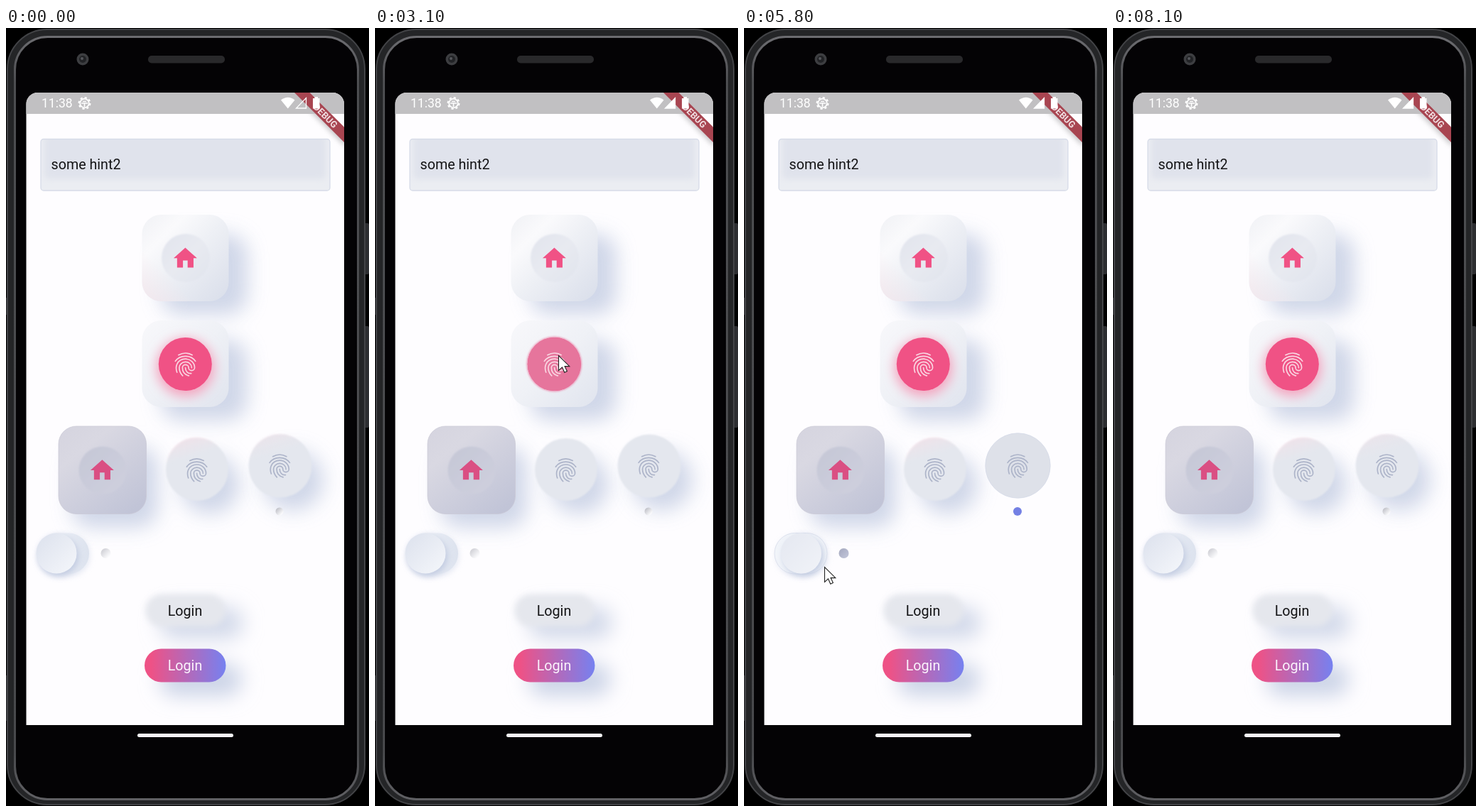
An HTML page that plays this animation: 511 by 1096 pixels, repeating every 8.8 s.

```html
<!DOCTYPE html>
<html lang="en">
<head>
<meta charset="utf-8">
<title>Soft UI demo</title>
<style>
  html, body { margin: 0; width: 100%; height: 100%; overflow: hidden; background: #000; }
  svg { display: block; width: 100%; height: 100%; }
  text { font-family: Roboto, "Open Sans", sans-serif; }
</style>
</head>
<body>
<svg viewBox="0 0 511 1096" preserveAspectRatio="none">
  <defs>
    <filter id="b1" x="-50%" y="-50%" width="200%" height="200%"><feGaussianBlur stdDeviation="1.2"/></filter>
    <filter id="b4" x="-50%" y="-50%" width="200%" height="200%"><feGaussianBlur stdDeviation="4"/></filter>
    <filter id="b9" x="-50%" y="-50%" width="200%" height="200%"><feGaussianBlur stdDeviation="8"/></filter>
    <filter id="b14" x="-60%" y="-60%" width="220%" height="220%"><feGaussianBlur stdDeviation="14"/></filter>
    <linearGradient id="rim" x2="0" y2="1">
      <stop stop-color="#6c6c70"/><stop offset=".06" stop-color="#4c4d50"/>
      <stop offset=".94" stop-color="#48494c"/><stop offset="1" stop-color="#606064"/>
    </linearGradient>
    <linearGradient id="tile" x2="1" y2="1">
      <stop stop-color="#f0f1f5"/><stop offset=".25" stop-color="#fafafc"/><stop offset=".5" stop-color="#eef0f5"/><stop offset="1" stop-color="#d9deea"/>
    </linearGradient>
    <linearGradient id="paleTile" x2="1" y2="1">
      <stop stop-color="#f8f8fb"/><stop offset=".5" stop-color="#eff1f6"/><stop offset="1" stop-color="#e0e4ee"/>
    </linearGradient>
    <linearGradient id="dish" x2="1" y2="1">
      <stop stop-color="#e1e4ed"/><stop offset=".5" stop-color="#e8eaf1"/><stop offset="1" stop-color="#e0e4ed"/>
    </linearGradient>
    <linearGradient id="darkTile" x2=".8" y2="1">
      <stop stop-color="#d5d4df"/><stop offset=".3" stop-color="#d9d8e2"/><stop offset="1" stop-color="#c1c4d7"/>
    </linearGradient>
    <linearGradient id="darkDish" x2="1" y2="1">
      <stop stop-color="#c5c7d6"/><stop offset="1" stop-color="#cfd0de"/>
    </linearGradient>
    <linearGradient id="blush" x2=".3" y2="1">
      <stop stop-color="#f4dfe7"/><stop offset=".4" stop-color="#f0e4ea" stop-opacity="0"/>
    </linearGradient>
    <linearGradient id="lowBlush" x1="1" x2="0" y2="1">
      <stop offset=".7" stop-color="#f5e4ea" stop-opacity="0"/><stop offset="1" stop-color="#f5e4ea"/>
    </linearGradient>
    <linearGradient id="thumb" x2="1" y2="1">
      <stop stop-color="#dce1ed"/><stop offset="1" stop-color="#f5f7fb"/>
    </linearGradient>
    <linearGradient id="track"><stop stop-color="#fafbfd"/><stop offset="1" stop-color="#dce2ee"/></linearGradient>
    <linearGradient id="bead" x2="1" y2="1">
      <stop stop-color="#b4b5bd"/><stop offset=".8" stop-color="#fafafc"/>
    </linearGradient>
    <linearGradient id="candy"><stop offset=".08" stop-color="#ee5286"/><stop offset="1" stop-color="#7681f0"/></linearGradient>
    <clipPath id="screen"><path d="M28.500 982V107a16 16 0 0 1 16-16H460a16 16 0 0 1 16 16V982z"/></clipPath>
    <clipPath id="field"><rect x="49" y="156" width="407" height="73" rx="4"/></clipPath>
    <path id="home" d="M10 20v-6h4v6h5v-8h3L12 3 2 12h3v8z"/>
    <g id="print" fill="none" stroke-linecap="round">
      <path d="M6.2 4C9.8 2 14.2 2 17.8 4M3.5 9.2C7.5 3.6 16.5 3.6 20.5 9.2"/>
      <path d="M14.9 21.5C11.5 20.6 9.5 18 9.5 14.7C9.5 13.3 10.6 12.2 12.1 12.2S14.7 13.3 14.7 14.7C14.7 16 15.8 17.1 17.2 17.1S19.8 16 19.8 14.7C19.8 10.6 16.4 7.3 12.1 7.3C9 7.3 6.2 9 4.9 11.7C4 13.6 4 16 4.9 18.6"/>
      <path d="M9.7 21.5C7.8 19.6 6.8 17.8 6.8 14.7C6.8 12 9.2 9.8 12.1 9.8S17.3 12 17.3 14.7M12 14.7C12 18 14.4 19.9 16.9 19.5"/>
    </g>
  </defs>

  <!-- phone body -->
  <rect width="511" height="1096"/>
  <g fill="#2d2e31">
    <rect x="504" y="275" width="7" height="72" rx="2"/><rect x="504" y="420" width="7" height="143" rx="2"/>
    <rect y="380" width="3" height="24"/><rect y="912" width="3" height="64"/>
  </g>
  <rect x="2" y="2" width="503" height="1092" rx="56" fill="#242527" stroke="#434447" stroke-width="2"/>
  <rect x="12.500" y="12.500" width="483" height="1074" rx="46" fill="#040305" stroke="url(#rim)" stroke-width="3"/>
  <circle cx="108" cy="44" r="8.5" fill="#3d3e41"/><circle cx="108" cy="44" r="5" fill="#222326"/><circle cx="107" cy="43" r="2" fill="#55575c"/>
  <rect x="200" y="39" width="108" height="10.5" rx="5" fill="#29292b"/>
  <rect x="185" y="994" width="135" height="5" rx="2.5" fill="#f5f4f7"/>

  <g clip-path="url(#screen)">
    <rect x="28" y="91" width="448" height="891" fill="#fefdff"/>

    <!-- text field -->
    <g clip-path="url(#field)">
      <rect x="49" y="156" width="407" height="73" fill="#ebedf2"/>
      <rect x="54" y="150" width="396" height="63" rx="6" fill="#e0e3ec" filter="url(#b4)"/>
    </g>
    <rect x="49" y="156.5" width="407" height="72.5" rx="4" fill="none" stroke="#d7dce8" stroke-width="1.3"/>
    <text x="63.500" y="199" font-size="19.7" fill="#141416">some hint2</text>

    <!-- shadows -->
    <g fill="#cbd3e6" filter="url(#b14)" opacity=".9">
      <rect x="218" y="290" width="122" height="114" rx="28"/>
      <rect x="218" y="439" width="122" height="114" rx="28"/>
      <rect x="92" y="590" width="122" height="114" rx="28"/>
      <circle cx="287" cy="643" r="42"/>
    </g>
    <circle id="keyShadow" cx="404" cy="637" r="43" fill="#cbd3e6" filter="url(#b14)" opacity=".9"/>

    <!-- first tile -->
    <rect x="191.500" y="263" width="122" height="122" rx="27" fill="url(#tile)"/>
    <rect class="tint" x="191.500" y="263" width="122" height="122" rx="27" fill="url(#lowBlush)" opacity=".7"/>
    <circle cx="253" cy="324" r="34" fill="url(#dish)" filter="url(#b1)"/>
    <use href="#home" fill="#f05285" transform="translate(232.600 304.500) scale(1.65)"/>

    <!-- pink button -->
    <rect x="191.500" y="412" width="122" height="122" rx="27" fill="url(#paleTile)"/>
    <circle id="glow" cx="252.500" cy="478" r="41" fill="#f4a6c0" filter="url(#b9)"/>
    <circle id="halo" cx="252.300" cy="473.500" r="39" fill="#ea7fa5" filter="url(#b1)"/>
    <circle cx="252.300" cy="473.500" r="37.500" fill="#f05285"/>
    <circle id="pressed" cx="252.300" cy="473.500" r="37.500" fill="#e6759c"/>
    <use href="#print" stroke="#fad6e2" transform="translate(232.500 454) scale(1.67)"/>

    <!-- dark tile -->
    <rect x="74" y="561" width="123.500" height="123.500" rx="25" fill="url(#darkTile)" stroke="#c9c7d5" stroke-width=".7"/>
    <circle cx="136" cy="623" r="33.500" fill="url(#darkDish)" filter="url(#b1)"/>
    <use href="#home" fill="#da4f83" transform="translate(115.600 603.200) scale(1.65)"/>

    <!-- round buttons -->
    <circle cx="269" cy="622" r="44" fill="#e4e7ee" filter="url(#b1)"/>
    <circle class="tint" cx="268.500" cy="621.500" r="45" fill="url(#blush)" filter="url(#b1)"/>
    <use href="#print" stroke="#adb4c9" transform="translate(248.500 602.800) scale(1.67)"/>
    <g id="keyUp">
      <circle cx="386" cy="617" r="44.500" fill="#e4e7ee" filter="url(#b1)"/>
      <circle class="tint" cx="385.500" cy="616.500" r="45" fill="url(#blush)" filter="url(#b1)" opacity=".6"/>
    </g>
    <circle id="keyDown" cx="385.500" cy="616.500" r="45.700" fill="#dee1e9" stroke="#d5dae7" stroke-width=".8"/>
    <use href="#print" stroke="#adb4c9" transform="translate(365.200 597) scale(1.67)"/>
    <circle cx="385" cy="681" r="5.500" fill="url(#bead)"/>
    <circle id="keyLamp" cx="385" cy="681" r="6" fill="#7480e4"/>

    <!-- switch -->
    <rect x="45" y="714" width="73" height="58" rx="29" fill="#d3daea" filter="url(#b4)" opacity=".6"/>
    <rect x="43" y="711.500" width="74" height="57.500" rx="28.700" fill="url(#track)"/>
    <rect id="trackOn" x="43" y="711.500" width="74" height="57.500" rx="28.700" fill="#f1f4f9" stroke="#dde2ee"/>
    <g id="knob">
      <circle cx="74" cy="744" r="28.500" fill="#bcc6de" filter="url(#b4)" opacity=".85"/>
      <circle cx="71" cy="740" r="28.500" fill="url(#thumb)"/>
      <circle id="knobOn" cx="71" cy="740" r="28.500" fill="#edf0f6"/>
    </g>
    <circle cx="140.500" cy="740" r="7" fill="url(#bead)" opacity=".75"/>
    <circle id="lamp" cx="140.500" cy="740" r="7" fill="#7f87ae"/>

    <!-- login buttons -->
    <g fill="#ccd4e7" filter="url(#b14)">
      <rect id="softShadow" x="216" y="815" width="118" height="46" rx="22" opacity=".85"/>
      <rect id="candyShadow" x="216" y="895" width="116" height="46" rx="22"/>
    </g>
    <rect x="196" y="797.500" width="113" height="46" rx="23" fill="#e5e7ed" filter="url(#b4)"/>
    <rect id="softDown" x="195.500" y="797.500" width="114" height="46" rx="23" fill="#dee1e9"/>
    <rect x="195" y="874.500" width="114.500" height="47" rx="23.500" fill="url(#candy)"/>
    <g font-size="19.7" text-anchor="middle">
      <text x="252" y="828" fill="#141416">Login</text>
      <text x="252" y="905" fill="#fbf3fb">Login</text>
    </g>

    <!-- status bar -->
    <path d="M409 88L479 158V166L401 88z" filter="url(#b4)" opacity=".35"/>
    <rect x="28" y="91" width="448" height="30" fill="#c1c0c2"/>
    <path d="M406 91L476 161V139.500L427.500 91z" fill="#a84551"/>
    <text transform="translate(446.500 127) rotate(45)" font-size="13" font-weight="700" text-anchor="middle" fill="#f0dde0">DEBUG</text>
    <text x="50" y="112.300" font-size="17.500" fill="#fff">11:38</text>
    <g fill="none" stroke="#fff">
      <circle cx="110.500" cy="106" r="6.300" stroke-width="1.800"/>
      <circle cx="110.500" cy="106" r="8" stroke-width="2" stroke-dasharray="3.140"/>
      <path d="M106 106h9M110.500 106v5M108 103.500h5" stroke-width="1.600"/>
    </g>
    <g fill="#fff">
      <path d="M387 101.500Q397 94 406.500 101.500L396.800 113.500z"/>
      <path id="signal" d="M422.500 98.500V113H408.500z" stroke="#fff" stroke-width="1.300"/>
      <path d="M434.500 97h4.500v2h2.500v14.500h-9.500V99h2.500z"/>
    </g>
  </g>

  <path id="cursor" d="M.5.5v21l5-4.600 3.300 7.300 3.600-1.600-3.300-7h6.700z" fill="#fff" stroke="#222" stroke-width="1.100"/>
</svg>
<script>
  const LOOP = 8800, STEP = 100;
  const $ = id => document.getElementById(id);
  const tints = document.querySelectorAll(".tint");
  const baseTints = [...tints].map(el => +(el.getAttribute("opacity") || 1));

  // pointer stops: time, x, y
  const path = [
    [1000, 440, 150], [1200, 310, 330], [1300, 288, 362], [1500, 288, 362], [1700, 266, 326],
    [2300, 262, 325], [2700, 258, 461], [3700, 258, 461], [4100, 397, 634], [4500, 397, 634],
    [4800, 94, 750], [5400, 94, 750], [5800, 113, 759], [5900, 269, 835], [6000, 269, 835],
    [6300, 262, 826], [6500, 258, 897], [6800, 270, 890], [6900, 387, 698], [7000, 399, 645],
    [7100, 400, 639], [7600, 400, 639], [7800, 394, 639]
  ];

  const ramp = (t, from, to) => Math.min(1, Math.max(0, (t - from) / (to - from)));
  const pulse = (t, from, to) => ramp(t, from, from + 200) - ramp(t, to - 200, to);
  const fade = (id, value) => $(id).setAttribute("opacity", value);

  function pointerAt(t) {
    const i = path.findIndex(stop => stop[0] >= t);
    if (i < 0 || t < path[0][0]) return null;
    const b = path[i], a = path[Math.max(0, i - 1)];
    const k = a === b ? 1 : ramp(t, a[0], b[0]);
    return [a[1] + (b[1] - a[1]) * k, a[2] + (b[2] - a[2]) * k];
  }

  function draw(t) {
    const pointer = pointerAt(t);
    fade("cursor", pointer ? 1 : 0);
    if (pointer) $("cursor").setAttribute("transform", `translate(${pointer})`);

    $("signal").setAttribute("fill-opacity", t < 100 ? 0 : 1);

    const press = pulse(t, 2800, 3700);
    fade("pressed", press);
    fade("halo", press * 0.7);
    fade("glow", 1 - press);
    tints.forEach((el, i) => el.setAttribute("opacity", baseTints[i] * (1 - press)));

    const keyOn = t >= 4400 && t < 7500 ? 1 : 0;
    fade("keyDown", keyOn);
    fade("keyLamp", keyOn);
    fade("keyUp", 1 - keyOn);
    fade("keyShadow", keyOn ? 0 : 0.9);

    const on = ramp(t, 5000, 5300) - ramp(t, 5700, 5900);
    $("knob").setAttribute("transform", `translate(${on * 19} 0)`);
    fade("knobOn", on);
    fade("trackOn", Math.min(1, on * 2));
    fade("lamp", on);

    const soft = pulse(t, 6000, 6400), candy = pulse(t, 6400, 6900);
    fade("softDown", soft);
    fade("softShadow", 0.85 * (1 - soft));
    fade("candyShadow", 1 - candy);
  }

  let last = -1;
  const start = performance.now();
  function tick() {
    const t = Math.floor(((performance.now() - start) % LOOP) / STEP) * STEP;
    if (t !== last) draw(last = t);
    requestAnimationFrame(tick);
  }
  tick();
</script>
</body>
</html>
```
